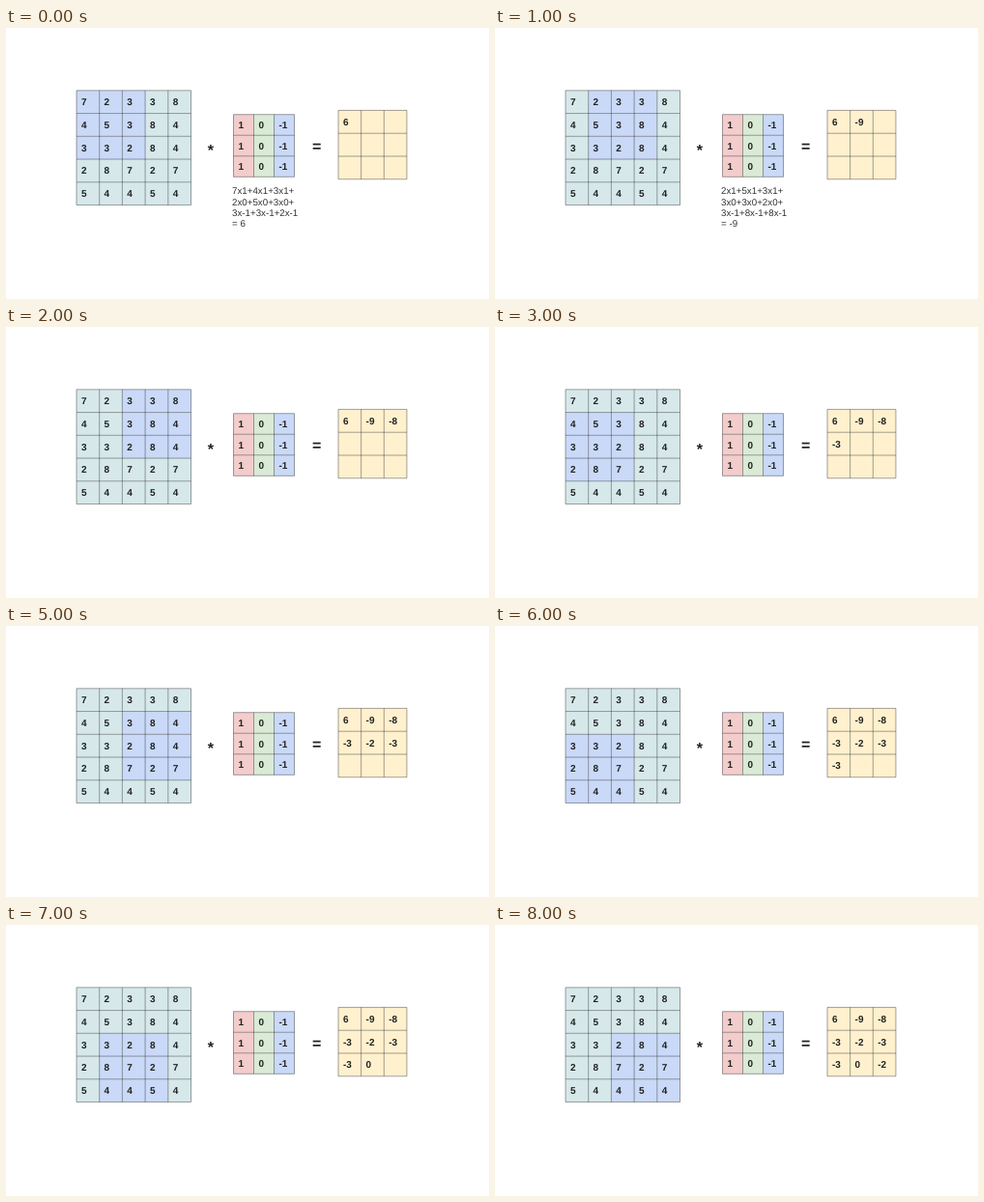
Animation, 500 px wide and 281 px high, one loop 9000 ms. Source, as an HTML page:

```html
<!DOCTYPE html>
<html lang="en">
<head>
<meta charset="utf-8">
<title>Convolution step by step</title>
<style>
  html, body { margin: 0; width: 100%; height: 100%; overflow: hidden; background: #fff; }
  svg { display: block; width: 100%; height: 100%; }
  text {
    font-family: "Liberation Sans", Arial, sans-serif; fill: #222;
    white-space: pre; text-rendering: geometricPrecision;
  }
  .num { font-size: 10px; font-weight: bold; }
  .op { font-size: 16px; font-weight: bold; }
  .sum { font-size: 9.75px; fill: #333; }
  .line { stroke: #000; stroke-opacity: .36; fill: none; }
</style>
</head>
<body>
<svg id="stage" viewBox="0 0 500 281"></svg>
<script>
const STEP = 1000, COUNT = 9;
const TEAL = '#d6e8ea', BLUE = '#c9d9f7', RED = '#f3cccc', GREEN = '#d9ead5', YELLOW = '#fff1ce';
const input = '72338 45384 33284 28727 54454'.split(' ').map(row => [...row].map(Number));
const range = n => [...Array(n).keys()];
const weight = c => 1 - c;
const stage = document.getElementById('stage');

function add(tag, attrs, content = '') {
  const el = document.createElementNS('http://www.w3.org/2000/svg', tag);
  for (const key in attrs) el.setAttribute(key, attrs[key]);
  el.textContent = content;
  return stage.appendChild(el);
}

function label(cls, x, y, content) {
  return add('text', { class: cls, x, y }, content);
}

// Draws n by n cells of w by h; returns the fills and labels row by row.
function grid({ x, y, w, h, n, fill, value }) {
  const each = draw => range(n * n).map(i => draw(Math.floor(i / n), i % n));
  const cells = each((r, c) => add('rect', {
    x: x + c * w, y: y + r * h, width: w, height: h, fill: fill(c)
  }));
  const d = range(n + 1).map(i =>
    `M${x + i * w} ${y}v${n * h}M${x} ${y + i * h}h${n * w}`).join('');
  add('path', { class: 'line', d });
  const labels = each((r, c) =>
    label('num', x + 4.9 + c * w, y + h / 2 + 3.5 + r * h, value(r, c)));
  return { cells, labels };
}

const place = step => [Math.floor(step / 3), step % 3];

function columns(step) {
  const [row, col] = place(step);
  return range(3).map(c => range(3).map(r => input[row + r][col + c]));
}

function result(step) {
  return columns(step).flatMap((col, c) => col.map(n => n * weight(c)))
    .reduce((a, b) => a + b);
}

function working(step) {
  const lines = columns(step).map((col, c) =>
    col.map(n => n + 'x' + weight(c)).join('+') + (c < 2 ? '+' : ''));
  return [...lines, '= ' + result(step)];
}

const source = grid({
  x: 73, y: 64.8, w: 23.7, h: 23.75, n: 5,
  fill: () => TEAL, value: (r, c) => input[r][c]
});
grid({
  x: 235.5, y: 89.7, w: 21, h: 21.55, n: 3,
  fill: c => [RED, GREEN, BLUE][c], value: (r, c) => weight(c)
});
const output = grid({
  x: 344, y: 85.4, w: 23.65, h: 23.8, n: 3,
  fill: () => YELLOW, value: (r, c) => result(r * 3 + c)
});
label('op', 208.8, 131.8, '*');
label('op', 317, 128.4, '=');
const sums = range(4).map(i => label('sum', 234, 172.3 + i * 11.3, ''));

function show(step) {
  const [row, col] = place(step);
  const inside = (i, from) => i >= from && i < from + 3;
  source.cells.forEach((cell, i) => {
    const active = inside(Math.floor(i / 5), row) && inside(i % 5, col);
    cell.setAttribute('fill', active ? BLUE : TEAL);
  });
  output.labels.forEach((el, i) => el.setAttribute('visibility', i <= step ? 'visible' : 'hidden'));
  // Only the first two steps spell out their arithmetic.
  const lines = step < 2 ? working(step) : [];
  sums.forEach((el, i) => el.textContent = lines[i] || '');
}

const start = performance.now();
let shown = -1;
function tick() {
  const step = Math.floor(Math.max(0, performance.now() - start) / STEP) % COUNT;
  if (step !== shown) show(shown = step);
  requestAnimationFrame(tick);
}
tick();
</script>
</body>
</html>
```
